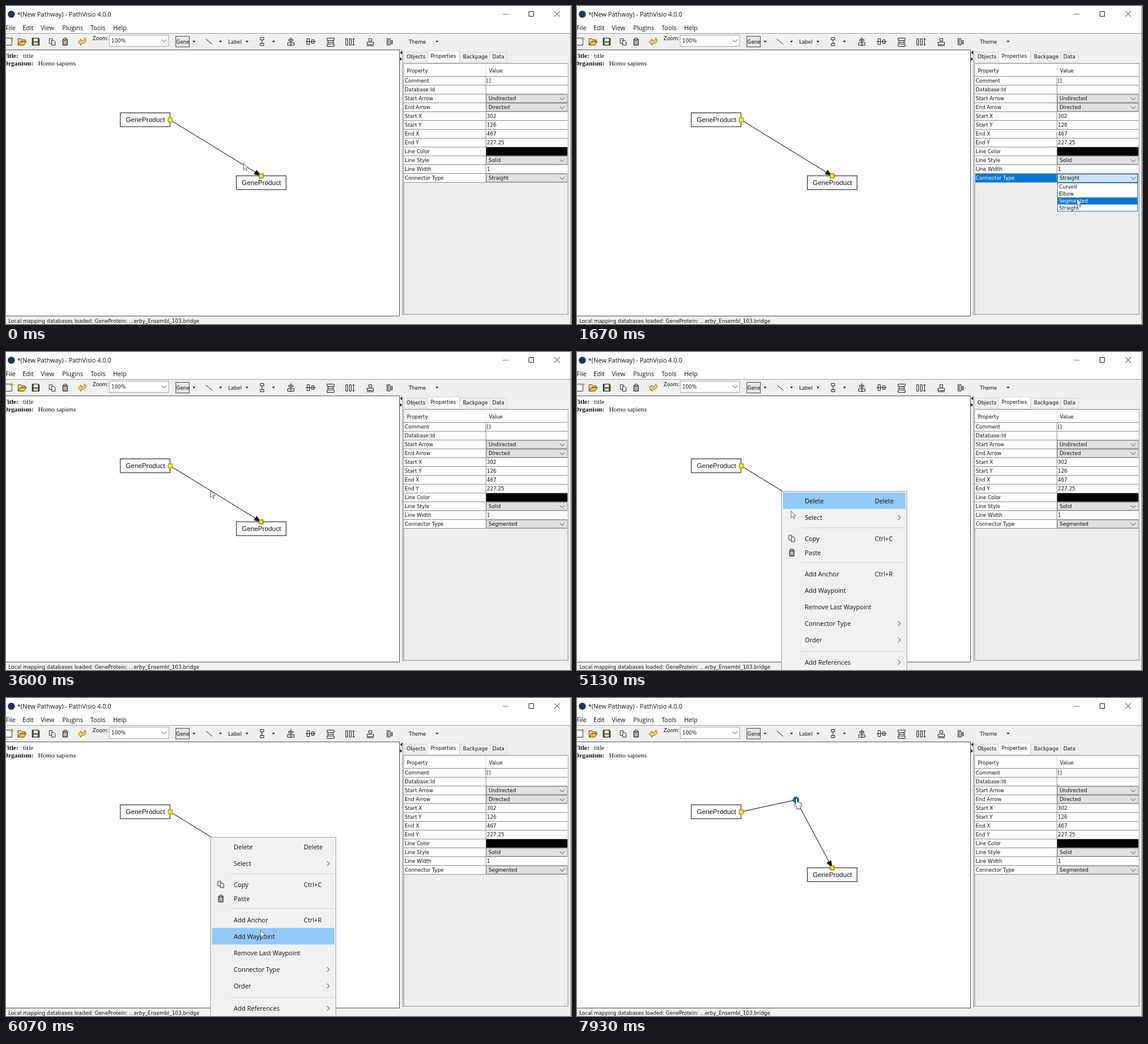
An HTML page for the animation above (8 s loop, 960 by 540 pixels).

```html
<!DOCTYPE html>
<html lang="en">
<head>
<meta charset="utf-8">
<title>Pathway editor</title>
<style>
html, body { margin: 0; width: 100%; height: 100%; overflow: hidden; background: #fff; }
svg { display: block; width: 960px; height: 540px; }
text { white-space: pre; fill: #111; }
.ui { font: 10.6px "Open Sans", sans-serif; }
.menu { font: 10.7px "Open Sans", sans-serif; }
.tool { font: 8.5px "DejaVu Sans", sans-serif; }
.status { font: 8.57px "DejaVu Sans", sans-serif; }
.gene { font: 11.3px "Liberation Sans", sans-serif; text-anchor: middle; }
.serif { font: 11.25px "Liberation Serif", serif; }
.bold { font-weight: bold; }
</style>
</head>
<body>
<svg id="stage" viewBox="0 0 960 540" xmlns="http://www.w3.org/2000/svg"></svg>
<script>
const NS = "http://www.w3.org/2000/svg";
const stage = document.getElementById("stage");
const START = [278.7, 193.2], END = [433.6, 288.3];

function add(parent, tag, attrs, content) {
  const node = document.createElementNS(NS, tag);
  for (const key in attrs) node.setAttribute(key, attrs[key]);
  if (content !== undefined) node.textContent = content;
  parent.append(node);
  return node;
}
const group = (parent = stage) => add(parent, "g", {});
const fillBox = (p, x, y, width, height, fill) => add(p, "rect", { x, y, width, height, fill });
const frame = (p, x, y, width, height, fill, stroke) =>
  add(p, "rect", { x: x + 0.5, y: y + 0.5, width, height, fill, stroke });
const line = (p, d, stroke = "#222", width = 1) =>
  add(p, "path", { d, fill: "none", stroke, "stroke-width": width });
const shape = (p, d, fill, stroke = "none") => add(p, "path", { d, fill, stroke });
const label = (p, cls, x, y, str) => add(p, "text", { class: cls, x, y }, str);
const chevron = (p, x, y, color = "#444") => line(p, `M${x - 4} ${y - 2}l4 4 4-4`, color);
const show = (node, on) => node.setAttribute("visibility", on ? "visible" : "hidden");

function drawWindow() {
  const g = group();
  fillBox(g, 0, 0, 960, 540, "#f0f0f0");
  fillBox(g, 0, 0, 960, 47, "#fff");
  add(g, "circle", { cx: 9, cy: 14, r: 6, fill: "#1d3557" });
  label(g, "ui", 19, 18, "*(New Pathway) - PathVisio 4.0.0");
  line(g, "M844 14h10", "#555", 0.8);
  line(g, "M888.5 9.500h8v8h-8zM932 9l9 9m0-9l-9 9");
  const menus = { File: -0.5, Edit: 28, View: 59, Plugins: 95.5, Tools: 143.5, Help: 182 };
  for (const name in menus) label(g, "ui", menus[name], 41, name);
  line(g, "M0 46.500h960", "#a0a0a0");
}

function copyIcon(p, x, y) {
  shape(p, `M${x} ${y}h5v8h-5z`, "#fff", "#333");
  shape(p, `M${x + 4} ${y + 3}h4l2 2v6h-6z`, "#e8ecf4", "#333");
}
function pasteIcon(p, x, y) {
  shape(p, `M${x} ${y + 1}h8v10h-8z`, "#9b9182", "#333");
  shape(p, `M${x + 2} ${y - 1}h4v3h-4z`, "#ddd", "#333");
  line(p, `M${x + 2} ${y + 5}h4m-4 2.5h4`, "#eee");
}

function drawToolbar() {
  const g = group();
  shape(g, "M-1 54.500h8l3 3v9H-1z", "#fff", "#333");
  line(g, "M10 52v6M7 55h6M8 53l4 4", "#b58a1c");
  shape(g, "M20.500 66V55.500h5l1.500 2h6V60H25z", "#f4d57c", "#5f4b16");
  shape(g, "M20.500 66.500l4-6h10l-4 6z", "#f2bd42", "#5f4b16");
  shape(g, "M44.500 54.500h11l1 1v11h-12z", "#54652d", "#222");
  fillBox(g, 47, 55, 7, 5, "#f4f4f4");
  fillBox(g, 47, 62, 7, 4, "#d5d5d5");
  copyIcon(g, 73.5, 55.5);
  pasteIcon(g, 96.5, 55.5);
  shape(g, "M122.500 61l5-5v3c4 0 6-1 6-5 5 4 2 10-6 10v3z", "#f3cf68", "#8a6a1c");
  label(g, "tool", 147, 58, "Zoom:");
  frame(g, 175, 49, 101, 19, "#fff", "#adadad");
  label(g, "tool", 179, 62, "100%");
  chevron(g, 268.5, 59);
  frame(g, 288, 51, 23, 18, "#e6e6e6", "#555");
  label(g, "tool", 289.3, 64, "Gene");
  for (const x of [319.5, 364.5, 409.5, 454.5, 732.5]) shape(g, `M${x - 2.5} 59h5l-2.500 3z`, "#222");
  line(g, "M339.500 56l11 9");
  label(g, "tool", 377.5, 63.5, "Label");
  label(g, "tool", 684.5, 63.5, "Theme");
  // Alignment and stacking buttons
  line(g, "M432 53.500h6v4h-6zM432 63.500h6v4h-6zM435 58v5");
  line(g, "M484 53v15M480.500 56.500h7v3h-7zM478.500 62.500h11v4h-11z");
  line(g, "M509 60.500h17M511.500 55.500h4v10h-4zM519.500 57.500h4v6h-4z");
  line(g, "M545.500 54.500h12v4h-12zM545.500 64.500h12v4h-12zM546 61.500h11m-9-2l-2 2 2 2m7-4l2 2-2 2");
  line(g, "M577.500 55.500h3v11h-3zM583.500 55.500h3v11h-3zM590.500 55v12m-2-10l2-2 2 2m-4 8l2 2 2-2");
  line(g, "M616.500 55.500h5v4h-5zM613.500 61.500h11v4h-11zM613 67.500h12");
  line(g, "M647.500 54v13M649.500 55.500h3v11h-3zM654.500 58.500h2v6h-2z");
}

function drawGene(p, cx, cy) {
  const width = 84.5, height = 23.5;
  add(p, "rect", { x: cx - width / 2, y: cy - height / 2, width, height, fill: "#fff", stroke: "#111" });
  label(p, "gene", cx + 0.3, cy + 4.1, "GeneProduct");
}

function drawCanvas() {
  const g = group();
  fillBox(g, 0, 74, 668, 452, "#fff");
  line(g, "M0 74.500h668.500v452H0", "#555");
  label(g, "serif bold", -5, 87.7, "Title:");
  label(g, "serif", 29, 87.7, "title");
  label(g, "serif bold", -5, 101.3, "Organism:");
  label(g, "serif", 54.5, 101.3, "Homo sapiens");
  label(g, "status", 4, 537.5, "Local mapping databases loaded: GeneProtein: ...erby_Ensembl_103.bridge");
  drawGene(g, START[0] - 42.25, START[1]);
  drawGene(g, END[0], END[1] + 11.75);
}

const ROWS = [
  ["Comment", "[]"], ["Database:Id", ""], ["Start Arrow", "Undirected", true],
  ["End Arrow", "Directed", true], ["Start X", "302"], ["Start Y", "126"],
  ["End X", "467"], ["End Y", "227.25"], ["Line Color", ""],
  ["Line Style", "Solid", true], ["Line Width", "1"], ["Connector Type", "Straight", true]
];

function drawPanel() {
  const g = group();
  shape(g, "M673 76l-3.500 3 3.500 3zM669.500 87l3.500 3-3.500 3z", "#111");
  line(g, "M674 75v451M959.500 0v540", "#8c8c8c");
  frame(g, 676, 78, 175, 17, "#f0f0f0", "#d9d9d9");
  line(g, "M771.500 78v17M821.500 78v17", "#d9d9d9");
  frame(g, 716, 76, 54, 20, "#fff", "#d9d9d9");
  const tabs = { Objects: 680.5, Properties: 721.5, Backpage: 776.5, Data: 826.5 };
  for (const name in tabs) label(g, "tool", tabs[name], name === "Properties" ? 88 : 89, name);
  frame(g, 675.5, 97, 279, 426, "#eee", "#8c8c8c");
  fillBox(g, 676.5, 98, 278, 202, "#fff");
  line(g, "M815.500 98v22", "#ddd");
  label(g, "tool", 681, 112.5, "Property");
  label(g, "tool", 820.5, 112.5, "Value");
  let value;
  ROWS.forEach(([name, text, combo], i) => {
    const y = 120 + 15 * i;
    line(g, `M676 ${y + 14.5}h278`, "#909090");
    label(g, "tool", 677.5, y + 10, name);
    if (combo) {
      frame(g, 816, y, 137, 13, "#e1e1e1", "#adadad");
      chevron(g, 945, y + 7.5);
    }
    value = label(g, "tool", combo ? 820 : 817, y + 10, text);
  });
  fillBox(g, 816, 240, 138, 14, "#000");
  line(g, "M676 119.500h278M815.500 120v179.500", "#909090");
  return value;
}

function drawDropdown() {
  const g = group();
  fillBox(g, 677, 285, 138, 14, "#0078d7");
  add(g, "text", { class: "tool", x: 677.5, y: 295, style: "fill:#fff" }, "Connector Type");
  frame(g, 816, 285, 136, 14, "#cce4f7", "#2a6fa8");
  chevron(g, 945.5, 292.5);
  label(g, "tool", 820, 295, "Straight");
  frame(g, 816, 300, 136, 48, "#fff", "#2a78bd");
  const bar = fillBox(g, 817, 337, 135, 12, "#0078d7");
  const items = ["Curved", "Elbow", "Segmented", "Straight"].map((s, i) =>
    label(g, "tool", 819, 309.7 + 12.2 * i, s));
  return {
    g,
    pick(n) {
      bar.setAttribute("y", 300.7 + 12.2 * n);
      items.forEach((t, i) => { t.style.fill = i === n ? "#fff" : "#111"; });
    }
  };
}

// name, centre, shortcut or submenu mark
const ITEMS = [
  ["Delete", 253, "Delete"], ["Select", 281, ">"], ["Copy", 317, "Ctrl+C"], ["Paste", 341, ""],
  ["Add Anchor", 377, "Ctrl+R"], ["Add Waypoint", 405, ""], ["Remove Last Waypoint", 433, ""],
  ["Connector Type", 461, ">"], ["Order", 489, ">"], ["Add References", 527, ">"]
];

function drawContextMenu() {
  const g = group();
  frame(g, 347, 236, 213, 320, "#f1f1f1", "#a2a2a2");
  const bar = fillBox(g, 350, 239, 208, 28, "#91c9f7");
  line(g, "M382 298.500h176M382 357.500h176M382 508.500h176", "#d2d2d2");
  for (const [name, y, extra] of ITEMS) {
    label(g, "menu", 387, y + 4, name);
    if (extra === ">") line(g, `M545.5 ${y - 4}l4 4-4 4`, "#333");
    else label(g, "menu", 506, y + 4, extra);
  }
  copyIcon(g, 360, 311);
  pasteIcon(g, 361, 335.5);
  return {
    g,
    hover(y) {
      const item = ITEMS.find(([, c]) => Math.abs(y - c) <= 14);
      show(bar, y > 239 && item && g.getAttribute("visibility") === "visible");
      if (item) bar.setAttribute("y", item[1] - 14.5);
    }
  };
}

drawWindow();
drawToolbar();
drawCanvas();
const typeValue = drawPanel();

const edge = line(stage, "", "#000");
const head = shape(stage, "M0 0l-12-4.500v9z", "#000");
line(stage, "M280 190.500h2.500v6H280", "#222");
frame(stage, 275, 189.5, 7, 7, "#ffef00", "#8a8220");
frame(stage, 429.5, 284.5, 7, 7, "#ffef00", "#55500a");
const knob = add(stage, "circle", { r: 5, fill: "#1878cf", stroke: "#0d3f70" });
const dropdown = drawDropdown();
const context = drawContextMenu();
const arrow = shape(stage, "M.5 .5v11.500l2.700-2.500 1.900 4.200 1.900-.8-1.900-4.200h3.600z", "#fff", "#444");
const hand = shape(stage,
  "M-1.500 1c0-2 3-2 3 0v5l1.500-.5 1 1 1.500-.3 1 1 1.500.3v5l-1.500 3v2h-6v-2l-4-5c-1-2 1-2.500 2-1z",
  "#fff", "#222");
arrow.setAttribute("stroke-width", 0.8);
hand.setAttribute("stroke-width", 0.9);

// time, x, y of the pointer
const POINTER = [
  [0, 403, 266], [600, 857, 290], [1250, 857, 290], [1670, 849, 327], [2200, 849, 327],
  [2670, 407, 264], [3270, 349, 237], [3400, 349, 237], [3600, 347, 235], [4400, 347, 235],
  [4730, 356.5, 256], [5000, 356.5, 256], [5733, 434, 412], [6000, 432, 394],
  [6200, 432, 394], [6733, 367, 247], [7067, 358, 239], [7270, 358, 239], [7930, 373, 171]
];
const OPEN = 1000, PICKED = 1930, MENU = 4400, MENU_END = 6260, GRAB = 6930;

function pointer(t) {
  const i = POINTER.findIndex(k => k[0] > t);
  if (i < 0) return POINTER.at(-1).slice(1);
  const a = POINTER[Math.max(i - 1, 0)], b = POINTER[i];
  const u = Math.max(0, (t - a[0]) / (b[0] - a[0]));
  const s = u * u * (3 - 2 * u);
  return [a[1] + (b[1] - a[1]) * s, a[2] + (b[2] - a[2]) * s];
}

function render(ms) {
  const t = Math.floor((ms % 8000 + 4) * 0.015) / 0.015;
  const [x, y] = pointer(t);

  show(dropdown.g, t >= OPEN - 1 && t < PICKED);
  dropdown.pick(y < 301 ? 3 : Math.min(3, Math.floor((y - 300.5) / 12.2)));
  typeValue.textContent = t < PICKED ? "Straight" : "Segmented";

  show(context.g, t >= MENU - 1 && t < MENU_END);
  context.hover(pointer(t - 67)[1]);

  const bent = t >= MENU_END;
  const way = t < 7270 ? [357, 241] : [x - 1, y + 2];
  const from = bent ? way : START;
  edge.setAttribute("d", `M${START}L${from}L${END}`);
  const angle = Math.atan2(END[1] - from[1], END[0] - from[0]) * 180 / Math.PI;
  head.setAttribute("transform", `translate(${END}) rotate(${angle})`);
  show(knob, bent);
  knob.setAttribute("cx", way[0]);
  knob.setAttribute("cy", way[1]);

  const grab = t >= GRAB;
  show(arrow, !grab);
  show(hand, grab);
  (grab ? hand : arrow).setAttribute("transform", `translate(${x} ${y})`);
}

const begin = performance.now();
function tick() {
  render(performance.now() - begin);
  requestAnimationFrame(tick);
}
tick();
</script>
</body>
</html>
```
